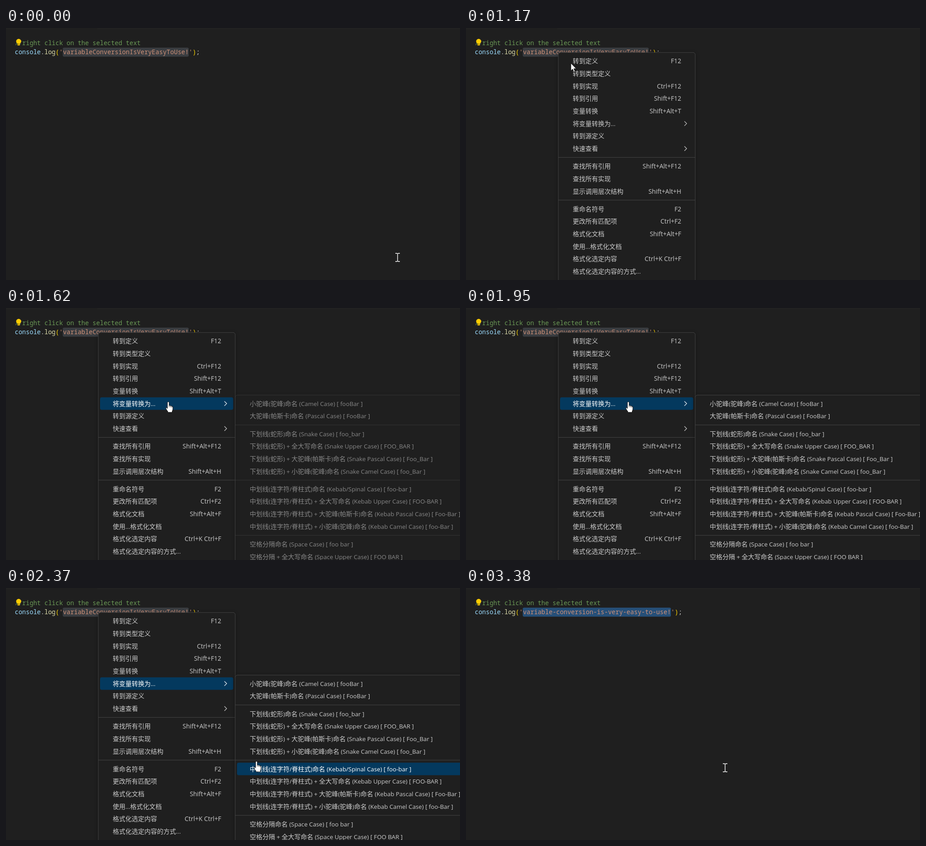
Write an HTML page that moves like this. It is 1004x558 px and loops after 3.64 s.

```html
<!DOCTYPE html>
<html lang="zh">
<head>
<meta charset="utf-8">
<title>Variable conversion</title>
<style>
  html, body { margin: 0; width: 100%; height: 100%; overflow: hidden; background: #1f1f1f; }
  svg { display: block; width: 1004px; height: 558px; }
  text { white-space: pre; }
  .code { font: 13.65px "Noto Sans Mono", monospace; fill: #ccc; }
  .menu { filter: drop-shadow(0 2px 4px rgba(0, 0, 0, .36)); }
  .menu text { font: 14px "Noto Sans CJK SC", "Noto Sans CJK", sans-serif; fill: #ccc; }
  .menu .latin { font-family: "Open Sans", "Noto Sans", sans-serif; font-size: 13.25px; }
  .menu .keys { font: 13.9px "Open Sans", "Noto Sans", sans-serif; text-anchor: end; }
  .menu .chevron { fill: none; stroke: #ccc; stroke-width: 1.2; }
  .menu .bar { fill: none; }
  .menu .on .bar { fill: #04395e; }
  .menu .on text { fill: #fff; }
  .menu .on .chevron { stroke: #fff; }
</style>
</head>
<body>
<svg viewBox="0 0 1004 558">
  <rect width="1004" height="558" fill="#1f1f1f"/>
  <path d="M0 0H76V1H0zM202 0H1004V1H202z" fill="#181818"/>
  <path d="M0 1.5H76M202 1.5H1004" stroke="#2b2b2b"/>

  <rect id="selection" x="125.5" y="43.5" height="20" rx="3"/>
  <g class="code">
    <text x="19.5" y="38" fill="#6a9955">//right click on the selected text</text>
    <text x="19.5" y="58"><tspan fill="#9cdcfe">console</tspan>.<tspan fill="#dcdcaa">log</tspan><tspan fill="#ffd700">(</tspan><tspan fill="#ce9178">'<tspan id="value"></tspan>'</tspan><tspan fill="#ffd700">)</tspan>;</text>
  </g>
  <rect id="caret" x="452" y="43.5" width="2" height="20" fill="#aeafad"/>

  <path d="M25.4 34.5Q22.4 32.6 22.4 29.7A5.6 5.6 0 0 1 33.6 29.7Q33.6 32.6 30.6 34.5V38.5H25.4z" fill="#fc0"/>
  <path d="M26.6 35.6H29.4" stroke="#1f1f1f"/>

  <g id="main" class="menu"></g>
  <g id="sub" class="menu"></g>

  <g id="cursor">
    <path id="beam" d="M-5-9H-1.5L0-8L1.5-9H5M0-8V8M-5 9H-1.5L0 8L1.5 9H5" fill="none" stroke="#fff" stroke-width="1.4"/>
    <path id="arrow" d="M0 0V16.5L3.8 13L6.4 19L9 17.9L6.5 12H11.6z" fill="#fff" stroke="#000" stroke-width=".8"/>
    <g id="hand" stroke="#000">
      <path d="M-2 1.5C-2-.7 1.8-.7 1.8 1.5V7.8Q4-.2 4.8 8.6Q7-.1 7.7 9.6Q10 9.2 10 11.7V16Q10 18 8.5 20.5V23H-1.2V21Q-4 18-5.3 14.5Q-5.6 12.2-3.9 12.3L-2 14.5z" fill="#fff" stroke-width=".9" visibility="hidden"/>
      <path d="M-2 1.5C-2-.7 1.8-.7 1.8 1.5V8Q4 7 4.8 8.8Q7 8 7.7 9.8Q10 9.2 10 11.7V16Q10 18 8.5 20.5V23H-1.2V21Q-4 18-5.3 14.5Q-5.6 12.2-3.9 12.3L-2 14.5z" fill="#fff" stroke-width=".9"/>
      <path d="M1.8 8V11.5M4.8 8.8V12M7.7 9.8V12.5" fill="none" stroke-width=".8"/>
    </g>
  </g>
</svg>
<script>
const LOOP = 3640, ROW = 27.7, GAP = 11.4;
const $ = id => document.getElementById(id);

// Each group is separated by a rule; a row is "label|shortcut", with ">" for a submenu.
const mainGroups = [
  ['转到定义|F12', '转到类型定义', '转到实现|Ctrl+F12', '转到引用|Shift+F12', '变量转换|Shift+Alt+T',
    '将变量转换为...|>', '转到源定义', '快速查看|>'],
  ['查找所有引用|Shift+Alt+F12', '查找所有实现', '显示调用层次结构|Shift+Alt+H'],
  ['重命名符号|F2', '更改所有匹配项|Ctrl+F2', '格式化文档|Shift+Alt+F', '使用...格式化文档',
    '格式化选定内容|Ctrl+K Ctrl+F', '格式化选定内容的方式...'],
];
const snake = '下划线(蛇形)', kebab = '中划线(连字符/脊柱式)';
const camel = '小驼峰(驼峰)命名', pascal = '大驼峰(帕斯卡)命名';
const subGroups = [
  [`${camel} (Camel Case) [ fooBar ]`, `${pascal} (Pascal Case) [ FooBar ]`],
  [`${snake}命名 (Snake Case) [ foo_bar ]`,
    `${snake} + 全大写命名 (Snake Upper Case) [ FOO_BAR ]`,
    `${snake} + ${pascal} (Snake Pascal Case) [ Foo_Bar ]`,
    `${snake} + ${camel} (Snake Camel Case) [ foo_Bar ]`],
  [`${kebab}命名 (Kebab/Spinal Case) [ foo-bar ]`,
    `${kebab} + 全大写命名 (Kebab Upper Case) [ FOO-BAR ]`,
    `${kebab} + ${pascal} (Kebab Pascal Case) [ Foo-Bar ]`,
    `${kebab} + ${camel} (Kebab Camel Case) [ foo-Bar ]`],
  ['空格分隔命名 (Space Case) [ foo bar ]', '空格分隔 + 全大写命名 (Space Upper Case) [ FOO BAR ]'],
];

function buildMenu(node, groups, left, top, width, textX) {
  let html = `<rect x="${left}" y="${top}" width="${width}" height="600" rx="5" fill="#1f1f1f" stroke="#454545"/>`;
  let y = top + 18.9;
  groups.forEach((group, g) => {
    if (g) {
      const rule = y - (ROW + GAP) / 2;
      html += `<path d="M${left} ${rule}h${width}" stroke="#454545"/>`;
    }
    for (const row of group) {
      const [label, keys] = row.split('|');
      const mixed = label.replace(/[ -~]+/g, '<tspan class="latin">$&</tspan>');
      html += `<g class="row"><rect class="bar" x="${left + 4}" y="${y - ROW / 2}" width="${width - 8.5}" height="${ROW}" rx="4"/>
        <text x="${textX}" y="${y + 5}">${mixed}</text>`;
      if (keys === '>') html += `<path class="chevron" d="M483 ${y - 5}l5 5l-5 5"/>`;
      else if (keys) html += `<text class="keys" x="476" y="${y + 5}">${keys}</text>`;
      html += '</g>';
      y += ROW;
    }
    y += GAP;
  });
  node.innerHTML = html;
  return [...node.querySelectorAll('.row')];
}
const mainRows = buildMenu($('main'), mainGroups, 204, 54.2, 303, 236);
const subRows = buildMenu($('sub'), subGroups, 506.8, 192.8, 520, 539);

// Pointer steps: time, x, y, shape, highlighted main row, highlighted submenu row.
const steps = [[0, 866, 508, 'beam']];
[60, 130, 200, 260, 330, 400, 470, 530].forEach((time, i) => {
  const u = (i + 1) / 8, ease = u * u * (3 - 2 * u);
  steps.push([time, 866 - 658.5 * ease, 508 - 454 * ease, 'beam']);
});
steps.push(
  [1170, 232, 78, 'arrow'],
  [1210, 265, 118, 'hand', 1],
  [1280, 318, 172, 'hand', 3],
  [1350, 346, 198, 'hand', 4],
  [1420, 359, 208, 'hand', 5],
  [2020, 370, 217, 'hand', 5],
  [2090, 403, 247, 'hand', 6],
  [2160, 455, 290, 'hand', 7],
  [2230, 504, 330, 'hand', 8],
  [2300, 535, 362, 'hand', 5, 5],
  [2360, 554, 384, 'hand', 5, 6],
  [2430, 565, 395, 'hand', 5, 6],
  [2500, 572, 398, 'hand', 5, 6],
  [2780, 573, 398, 'beam', 5, 6],
);

const opacity = (t, ...stops) => stops.reduce((value, [time, next]) => t >= time ? next : value, 0);
const show = (id, visible) => $(id).setAttribute('visibility', visible ? 'visible' : 'hidden');
const light = (rows, active) => rows.forEach((row, i) => row.classList.toggle('on', i === active));

function draw(t) {
  const done = t >= 2910;
  $('value').textContent = done ? 'variable-conversion-is-very-easy-to-use!' : 'variableConversionIsVeryEasyToUse!';
  $('selection').setAttribute('width', done ? 327.6 : 278.5);
  $('selection').setAttribute('fill', done ? '#264f78' : '#3a3d41');
  show('caret', done && t < 3380);

  $('main').style.opacity = opacity(t, [600, .5], [670, .9], [730, 1], [2910, 0]);
  $('sub').style.opacity = opacity(t, [1620, .6], [1690, 1], [2910, 0]);

  const [, x, y, shape, mainRow, subRow] = steps.findLast(step => step[0] <= t);
  light(mainRows, mainRow);
  light(subRows, subRow);
  $('cursor').setAttribute('transform', `translate(${x} ${y})`);
  for (const id of ['beam', 'arrow', 'hand']) $(id).style.display = id === shape ? '' : 'none';
}

const start = performance.now();
function tick() {
  draw((performance.now() - start) % LOOP);
  requestAnimationFrame(tick);
}
tick();
</script>
</body>
</html>
```
